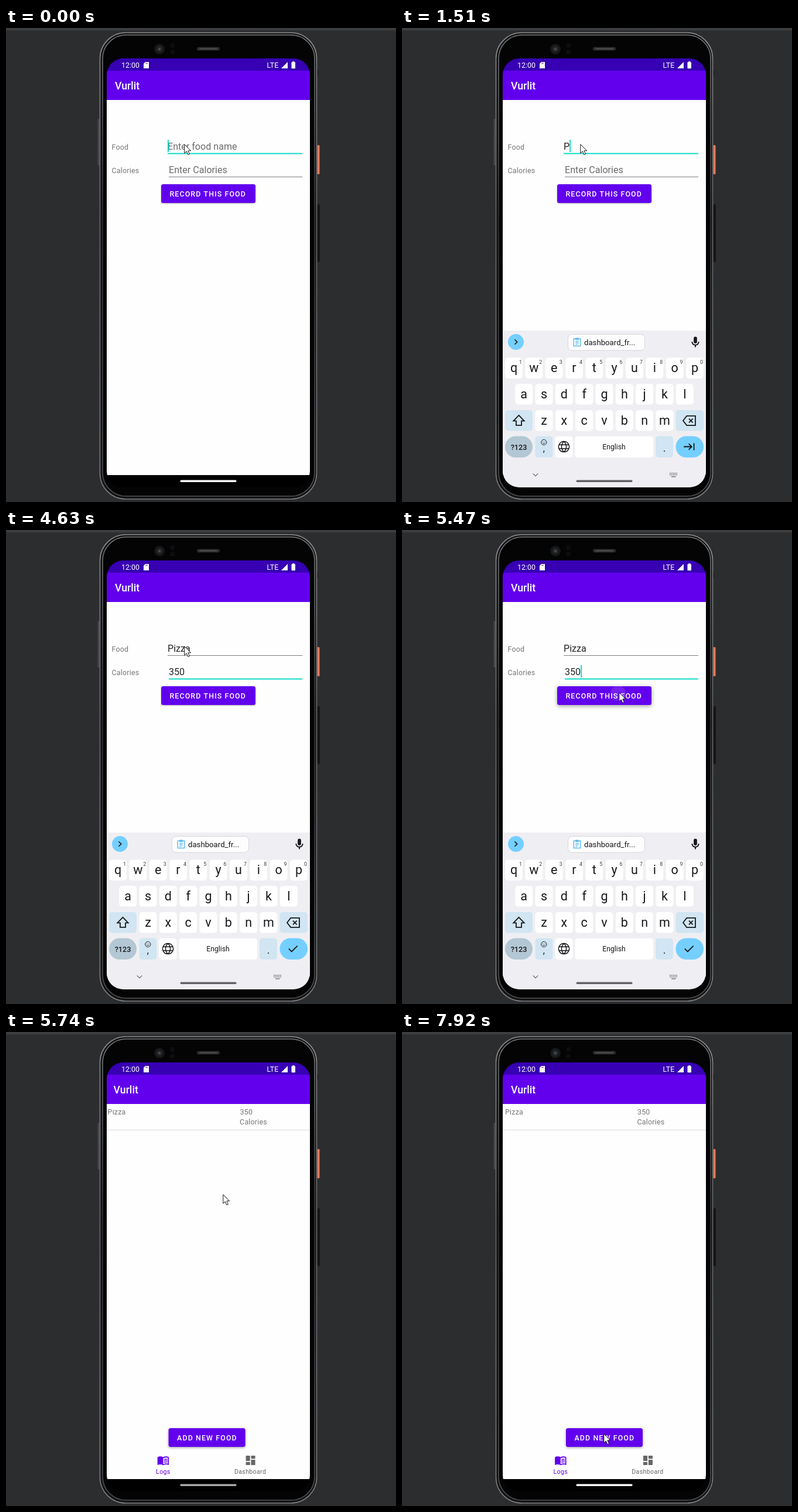
These frames come from a looping animation (666x810 px, 8000 ms). An HTML page with a canvas:

```html
<!DOCTYPE html>
<html lang="en">
<head>
<meta charset="utf-8">
<title>Food log</title>
<style>
html, body { margin: 0; width: 100%; height: 100%; overflow: hidden; background: #2c2d2f; }
canvas { display: block; }
</style>
</head>
<body>
<canvas id="stage" width="666" height="810"></canvas>
<script>
const ctx = document.getElementById('stage').getContext('2d');
const LOOP = 8000;
const PURPLE = '#6200ee', TEAL = '#03dac5', SKY = '#74cfff', PALE = '#d1e5f2', INK = '#17181a';

// Timelines: [start ms, value], each value holds until the next start.
const mouseAt = [
  [0, [304, 198]], [4780, [335, 202]], [4920, [358, 238]], [5040, [368, 268]], [5190, [370, 277]],
  [6190, [409, 370]], [6320, [448, 459]], [6740, [448, 468]], [6890, [428, 535]], [7010, [403, 602]],
  [7440, [397, 616]], [7560, [383, 640]], [7680, [366, 664]], [7800, [351, 680]], [7920, [344, 686]]
];
const foodText = [[0, ''], [1390, 'P'], [1750, 'Pi'], [1870, 'Piz'], [2110, 'Pizz'], [2260, 'Pizza']];
const calorieText = [[0, ''], [3550, '3'], [4100, '350']];
const caretOn = [[0, true], [640, false], [1150, true], [3180, false], [3550, true], [4630, false], [5040, true]];
const keyboardDrop = [[0, null], [250, 110], [370, 0], [5620, 150], [5740, null]];
const logShift = [[0, -14], [5740, -2.4], [5890, -0.8], [6040, 0]];
const pillColor = [
  [0, '#fff'], [370, '#efeff3'], [490, '#dcdcde'], [640, '#b4b4b6'], [1030, '#9a9a9c'], [1150, '#858587'],
  [1390, '#727274'], [1510, '#626264'], [5620, '#858585'], [5740, '#a9a9a9'], [5890, '#fff']
];
const valueAt = (line, t) => line.findLast(step => step[0] <= t)[1];

const shapes = {
  book: 'M21 5c-1.1-.35-2.3-.5-3.5-.5-1.95 0-4.05.4-5.5 1.5-1.45-1.1-3.55-1.5-5.5-1.5S2.45 4.9 1 6v15C3 20.4 5 20 6.5 20c1.95 0 4.05.4 5.5 1.5 1.35-.85 3.8-1.5 5.5-1.5 1.65 0 3.35.3 5.5 1.1V6c-.6-.45-1.25-.75-2-1zm0 13.5c-1.1-.35-2.3-.5-3.5-.5-1.7 0-4.15.65-5.5 1.5V8c1.35-.85 3.8-1.5 5.5-1.5 1.2 0 2.4.15 3.5.5z',
  bookLines: 'M13.5 10.6q3-1.2 6.5-.7M13.5 13.3q3-1.2 6.5-.7M13.5 16q3-1.2 6.5-.7',
  tiles: 'M3 13h8V3H3zM3 21h8v-6H3zM13 21h8V11h-8zM13 3v6h8V3z',
  mic: 'M12 14a3 3 0 0 0 3-3V5a3 3 0 0 0-6 0v6a3 3 0 0 0 3 3zM17 11a5 5 0 0 1-10 0H5a7 7 0 0 0 6 6.92V21h2v-3.08A7 7 0 0 0 19 11z',
  right: 'M9.5 7l5 5-5 5',
  down: 'M7 9.5l5 5 5-5',
  check: 'M3.5 12l5.5 5.5L20 6.5',
  next: 'M1 12h15M11 6l6 6-6 6M21.5 5v14',
  shift: 'M12 2.5L2 13h5v8h10v-8h5z',
  erase: 'M7.5 3.5H23v17H7.5L1 12zM11.5 8.5l7 7M18.5 8.5l-7 7',
  globe: 'M12 2a10 10 0 1 0 .01 0M3 8.5h18M3 15.5h18M12 2c-6 6-6 14 0 20c6-6 6-14 0-20',
  clip: 'M4 4h16v17H4zM9 2.5h6v3H9zM8 10h8M8 13.5h8M8 17h5',
  smile: 'M12 2a10 10 0 1 0 .01 0M7.5 14q4.5 6 9 0M8.5 8v2M15.5 8v2'
};

function text(str, x, y, size, color, { weight = 400, gap = 0, align = 'left' } = {}) {
  ctx.font = `${weight} ${size}px Roboto, sans-serif`;
  ctx.letterSpacing = gap + 'px';
  ctx.textAlign = align;
  ctx.fillStyle = color;
  ctx.fillText(str, x, y);
}

function rect(x, y, w, h, color) {
  ctx.fillStyle = color;
  ctx.fillRect(x, y, w, h);
}

function round(x, y, w, h, r, fill, stroke, width = 1) {
  ctx.beginPath();
  ctx.roundRect(x, y, w, h, r);
  if (fill) { ctx.fillStyle = fill; ctx.fill(); }
  if (stroke) { ctx.strokeStyle = stroke; ctx.lineWidth = width; ctx.stroke(); }
}

function circle(x, y, r, color) {
  ctx.beginPath();
  ctx.arc(x, y, r, 0, Math.PI * 2);
  ctx.fillStyle = color;
  ctx.fill();
}

function polygon(points, color) {
  ctx.beginPath();
  points.forEach(([x, y]) => ctx.lineTo(x, y));
  ctx.closePath();
  ctx.fillStyle = color;
  ctx.fill();
}

// Draws a 24-unit icon centred on (x, y); a line width means outline only.
function icon(name, x, y, scale, color, line) {
  const path = new Path2D(shapes[name]);
  ctx.save();
  ctx.translate(x - 12 * scale, y - 12 * scale);
  ctx.scale(scale, scale);
  if (line) {
    ctx.strokeStyle = color;
    ctx.lineWidth = line / scale;
    ctx.stroke(path);
  } else {
    ctx.fillStyle = color;
    ctx.fill(path);
  }
  ctx.restore();
}

function button(label, x, y, w, textX, lift = 2) {
  ctx.save();
  ctx.shadowColor = 'rgba(0,0,0,.38)';
  ctx.shadowBlur = lift * 2;
  ctx.shadowOffsetY = lift * 0.6;
  round(x, y, w, 32, 3.5, PURPLE);
  ctx.restore();
  text(label, textX, y + 20.5, 12.4, '#fff', { weight: 500, gap: 1.11 });
}

function drawPhone() {
  rect(0, 0, 666, 810, '#2c2d2f');
  rect(0, 0, 666, 4, '#3c3e40');
  round(156.5, 155, 3, 80, 1.5, '#47484a');
  round(531, 72, 2, 10, 1, '#1c1c1d');
  round(531.5, 200, 4, 50, 1.5, '#e57a5b');
  round(531.5, 301, 4.5, 99, 2, '#151516');
  const metal = ctx.createLinearGradient(0, 8, 0, 805);
  metal.addColorStop(0, '#8b8c8e');
  metal.addColorStop(0.4, '#66676a');
  metal.addColorStop(1, '#7c7d7f');
  const glint = ctx.createLinearGradient(0, 8, 0, 805);
  glint.addColorStop(0, '#77787a');
  glint.addColorStop(0.4, '#2f2f31');
  glint.addColorStop(1, '#505153');
  round(160.5, 8, 370, 797, 44, '#141415', metal, 1.6);
  round(165, 12, 362, 788, 40, '#040405', glint, 1.6);
  circle(262, 36, 9, '#161719');
  circle(262, 36, 5, '#25272a');
  circle(262, 36, 2, '#4a4c50');
  round(280, 26, 8, 8, 3, '#0d0d0f');
  round(280, 37, 8, 8, 3, '#0d0d0f');
  round(326, 32.5, 39, 6, 3, '#2b2b2d');
  round(330, 34.5, 31, 2, 1, '#505052');
}

function drawBars(shift) {
  rect(172, 52, 347, 733, '#000');
  rect(172, 123, 347, 641, '#fefefe');
  rect(172, 52, 347, 21, '#3700b3');
  rect(172, 73, 347, 50, PURPLE);
  text('12:00', 197, 68, 12.4, '#fff');
  polygon([[238, 58], [244, 58], [244, 69], [235, 69], [235, 61]], '#fff');
  rect(238.5, 59.5, 1, 2, '#3700b3');
  rect(240.5, 59.5, 1, 2, '#3700b3');
  text('LTE', 445.5, 67.5, 12.4, '#fff', { gap: 0.2 });
  polygon([[481, 58], [481, 69], [470, 69]], '#fff');
  round(487.5, 58.2, 6.5, 11, 1, '#fff');
  rect(489.3, 57, 3, 2, '#fff');
  text('Vurlit', 186 + shift, 105, 17.7, '#fff', { weight: 500 });
}

function field(value, hint, x, y, focused, caret) {
  text(value || hint, x, y, 16.1, value ? '#242424' : '#6b6b6b');
  const end = x + (value ? ctx.measureText(value).width : 0);
  if (focused) {
    rect(x, y + 5.6, 506 - x, 1.9, TEAL);
    if (caret) rect(end, y - 17, 1.8, 21, TEAL);
  } else {
    rect(x, y + 6, 506 - x, 1, '#7f7f7f');
  }
}

function drawForm(t) {
  const onCalories = t >= 2530, caret = valueAt(caretOn, t), pressed = t >= 5470;
  text('Food', 180.5, 207.5, 12.4, '#757575', { gap: 0.22 });
  text('Calories', 180.5, 247.5, 12.4, '#757575', { gap: 0.22 });
  field(valueAt(foodText, t), 'Enter food name', 276, 208, !onCalories, caret);
  field(valueAt(calorieText, t), 'Enter Calories', 278, 248, onCalories, caret);
  button('RECORD THIS FOOD', 265, 267, 161, 279.5, pressed ? 3.5 : 1.2);
  if (pressed) {
    ctx.save();
    ctx.beginPath();
    ctx.rect(265, 267, 161, 32);
    ctx.clip();
    circle(369, 279, 13, 'rgba(255,255,255,.12)');
    ctx.restore();
  }
}

function drawLogs(shift) {
  ctx.save();
  ctx.translate(shift, 0);
  const soft = { gap: 0.22 };
  text('Pizza', 176, 141, 12.4, '#757575', soft);
  text('350', 402, 141, 12.4, '#757575', soft);
  text('Calories', 401.5, 158, 12.4, '#757575', soft);
  button('ADD NEW FOOD', 280, 677, 131, 294.5);
  icon('book', 270.8, 732, 0.885, PURPLE);
  icon('bookLines', 270.8, 732, 0.885, PURPLE, 1.3);
  icon('tiles', 420, 732, 0.885, '#666');
  text('Logs', 258.5, 755, 10.6, PURPLE, { gap: 0.35 });
  text('Dashboard', 392.3, 755, 10.6, '#666', { gap: 0.35 });
  ctx.restore();
  rect(172, 167, 347, 1, '#dcdcdc');
}

function keyRow(letters, x, y, digits) {
  [...letters].forEach((letter, i) => {
    const left = x + i * 34.33;
    round(left, y, 30, 35.5, 5, '#fff');
    text(letter, left + 15, y + 24.5, 21.5, INK, { align: 'center' });
    if (digits) text((i + 1) % 10, left + 26.5, y + 10, 9, '#3c3d40', { align: 'center' });
  });
}

function drawKeyboard(drop, lastField) {
  ctx.save();
  ctx.translate(0, drop);
  rect(172, 517, 347, 268, '#efeff3');
  circle(194.5, 536.5, 13.5, SKY);
  icon('right', 194.5, 536.5, 0.85, INK, 1.7);
  round(283.5, 523.5, 131, 27.5, 7, '#fdfdfe', '#d6d6da');
  icon('clip', 299, 537, 0.72, '#5bbcf0', 1.4);
  text('dashboard_fr...', 311, 542, 13.2, INK);
  icon('mic', 501, 537, 0.95, INK);

  keyRow('qwertyuiop', 176, 563.5, true);
  keyRow('asdfghjkl', 193.2, 608, false);
  keyRow('zxcvbnm', 227.5, 653, false);
  round(176, 653, 47, 35.5, 5, PALE);
  icon('shift', 199.5, 670.5, 0.92, INK, 1.8);
  round(467.5, 653, 47.5, 35.5, 5, PALE);
  icon('erase', 490.5, 671, 0.95, INK, 1.8);

  round(176, 697.5, 47, 36.5, 18, '#b3c7d4');
  text('?123', 199.5, 720.5, 12.6, INK, { weight: 500, align: 'center' });
  round(227.5, 697.5, 30, 36.5, 5, PALE);
  icon('smile', 242.3, 708, 0.46, INK, 1);
  text(',', 242.3, 724, 16, INK, { align: 'center' });
  round(261.5, 697.5, 30, 36.5, 5, '#fff');
  icon('globe', 276.5, 715.5, 0.9, INK, 1.5);
  round(295.5, 697.5, 133.5, 36.5, 5, '#fff');
  text('English', 362, 720, 12.2, INK, { align: 'center' });
  round(433, 697.5, 30, 36.5, 5, PALE);
  text('.', 448, 724, 18, INK, { align: 'center' });
  round(467.5, 697.5, 47.5, 36.5, 18, SKY);
  icon(lastField ? 'check' : 'next', 490.5, 715.5, lastField ? 0.9 : 0.85, INK, 1.8);

  icon('down', 228, 763.5, 0.85, '#66676a', 1.3);
  for (let i = 0; i < 10; i++) rect(457 + i % 5 * 2.8, 760 + Math.floor(i / 5) * 2.8, 1.7, 1.7, '#77787b');
  rect(460, 766, 7.5, 1.5, '#77787b');
  ctx.restore();
}

function drawMouse(x, y) {
  const outline = new Path2D('M.8.8V16l3.5-3.3 2.5 5.8 2.6-1.1-2.5-5.6h4.7z');
  ctx.save();
  ctx.translate(x, y);
  ctx.fillStyle = '#fff';
  ctx.strokeStyle = '#15151a';
  ctx.lineWidth = 1;
  ctx.fill(outline);
  ctx.stroke(outline);
  ctx.restore();
}

function draw(t) {
  const logged = t >= 5620, shift = logged ? valueAt(logShift, t) : 0;
  const drop = valueAt(keyboardDrop, t);
  drawPhone();
  ctx.save();
  ctx.beginPath();
  ctx.roundRect(172, 52, 347, 733, 28);
  ctx.clip();
  drawBars(shift);
  if (logged) drawLogs(shift); else drawForm(t);
  if (drop !== null) drawKeyboard(drop, t >= 2650);
  round(297.5, 772.5, 96, 3.5, 1.75, valueAt(pillColor, t));
  ctx.restore();
  drawMouse(...valueAt(mouseAt, t));
}

function tick() {
  draw(performance.now() % LOOP);
  requestAnimationFrame(tick);
}
tick();
</script>
</body>
</html>
```
